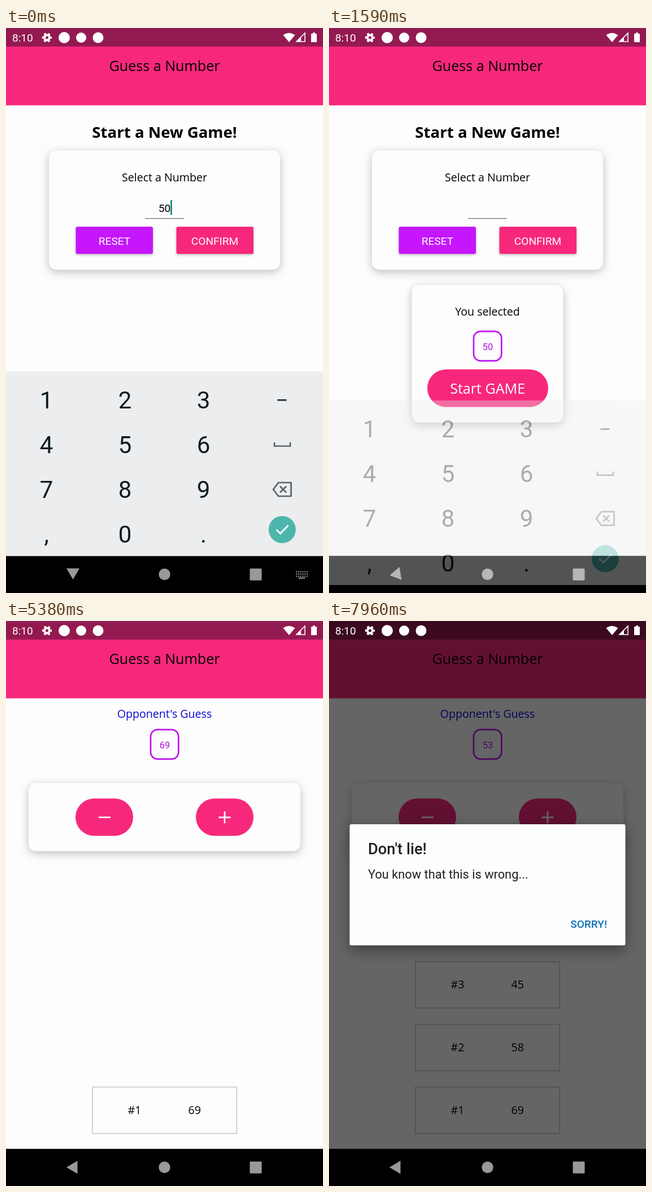
Animation of 561 by 998 pixels, one loop 8000 ms. Source, as an HTML page:

```html
<!DOCTYPE html>
<html lang="en">
<head>
<meta charset="utf-8">
<title>Guess a Number</title>
<style>
  html, body { margin: 0; width: 100%; height: 100%; overflow: hidden; background: #fdfdfd; }
  svg { display: block; width: 100vw; height: 100vh; font-family: Roboto, sans-serif; font-size: 19.1px; }
  .open { font-family: "Open Sans", sans-serif; font-size: 19.6px; }
  .mid { text-anchor: middle; }
  .title { font-size: 25.1px; }
  .head { font-size: 27.6px; font-weight: 700; }
  .medium { font-weight: 500; }
  .card { fill: #fdfdfd; filter: drop-shadow(0 4px 8px rgba(0, 0, 0, .25)); }
  .flat { filter: drop-shadow(0 2px 2px rgba(0, 0, 0, .25)); }
  .dialog { fill: #fdfdfd; filter: drop-shadow(0 8px 12px rgba(0, 0, 0, .4)); }
  .pink { fill: #f7287b; }
  .purple { fill: #c516fd; }
  .ring { fill: none; stroke: #c012ee; stroke-width: 2.7; }
  .picked { fill: #b414de; font-size: 16.4px; }
  .row rect { fill: none; stroke: #c8c8d0; stroke-width: 1.6; }
  .line { fill: none; stroke-width: 2.7; }
  #digits { font-size: 42px; fill: #0d1c22; }
</style>
</head>
<body>
<svg viewBox="0 0 561 998" preserveAspectRatio="none">
  <rect width="561" height="998" fill="#fdfdfd"/>
  <rect class="pink" width="561" height="136.6"/>
  <rect width="561" height="32.8" fill="#931a50"/>
  <text class="open mid title" x="280.5" y="76">Guess a Number</text>

  <g id="setup">
    <text class="open mid head" x="280.5" y="193.5">Start a New Game!</text>
    <rect class="card" x="76" y="216" width="409" height="211" rx="13.6"/>
    <text class="open mid" x="280.5" y="270.5">Select a Number</text>
    <path d="M246 336.5H315" stroke="#858585" stroke-width="1.5"/>
    <g id="entry">
      <text class="mid" x="280.5" y="324.5">50</text>
      <rect id="cursor" x="291.2" y="304" width="2.6" height="26" fill="#008577"/>
    </g>
    <rect class="purple flat" x="123.5" y="351" width="136.5" height="48" rx="3"/>
    <rect class="pink flat" x="301.5" y="351" width="136.5" height="48" rx="3"/>
    <text class="mid" x="192" y="382.5" fill="#fff">RESET</text>
    <text class="mid" x="369.5" y="382.5" fill="#fff">CONFIRM</text>
    <g id="selected">
      <rect class="card" x="146.5" y="454" width="268" height="243" rx="13.6"/>
      <text class="open mid" x="280.5" y="508">You selected</text>
      <rect class="ring" x="256" y="535.8" width="49.3" height="52" rx="12.3"/>
      <text class="mid picked" x="281" y="569">50</text>
      <g id="start">
        <rect class="pink" x="174" y="603" width="214" height="66.5" rx="33.2"/>
        <text class="open mid title" x="280.7" y="645.5" fill="#fff">Start GAME</text>
      </g>
    </g>
  </g>

  <g id="game">
    <text class="open mid" x="280.5" y="170.5" fill="#0808d0">Opponent's Guess</text>
    <rect class="ring" x="256" y="191.8" width="49.3" height="52" rx="12.3"/>
    <text id="guess" class="mid picked" x="281" y="225"></text>
    <rect class="card" x="40" y="286" width="481" height="120.5" rx="13.6"/>
    <g id="lower">
      <rect class="pink" x="123" y="313.5" width="102" height="66" rx="33"/>
      <path class="line" stroke="#fff" d="M164 346.8H185"/>
    </g>
    <g id="greater">
      <rect class="pink" x="336" y="313.5" width="102" height="66" rx="33"/>
      <path class="line" stroke="#fff" d="M376.5 346.8H397.5M387 336.3V357.3"/>
    </g>
    <g id="rows"></g>
  </g>

  <g id="alert">
    <rect width="561" height="933" opacity=".6"/>
    <rect class="dialog" x="36.5" y="359" width="488" height="214" rx="3"/>
    <text class="medium" x="69" y="412" font-size="27.3" fill="#202020">Don't lie!</text>
    <text x="69" y="454.5" font-size="21.8" fill="#202020">You know that this is wrong...</text>
    <text class="medium" x="492" y="542" text-anchor="end" fill="#1272b6">SORRY!</text>
  </g>

  <g id="status" fill="#fff">
    <text x="11" y="24">8:10</text>
    <circle cx="72.5" cy="17" r="4.5" fill="none" stroke="#fff" stroke-width="4"/>
    <circle cx="72.5" cy="17" r="7.3" fill="none" stroke="#fff" stroke-width="2.6" stroke-dasharray="4 3.645" stroke-dashoffset="2"/>
    <circle cx="103" cy="17" r="10"/>
    <circle cx="133" cy="17" r="9"/>
    <circle cx="163" cy="17" r="9.5"/>
    <path d="M490.5 12.5Q501 5 511.5 12.5L501 25Z"/>
    <path d="M529 9V24H514Z" fill="none" stroke="#fff" stroke-width="1.6"/>
    <path d="M522 16V24H514Z"/>
    <path d="M540 10H543V8H547V10H550V25H540Z"/>
  </g>

  <rect y="932.4" width="561" height="65.6"/>
  <g fill="#999">
    <path id="back" d="M107 954.5H130L118.5 974Z"/>
    <circle cx="280.5" cy="965" r="10.2"/>
    <rect x="431.5" y="954.8" width="21" height="21" rx="1.5"/>
    <g id="switcher" stroke="#999" stroke-width="2">
      <path d="M513 960.5H534.5M513 964.5H534.5M513 968.5H534.5" stroke-dasharray="2.2 1.6"/>
      <path d="M517.5 971.5H529.5"/>
    </g>
  </g>

  <g id="keyboard">
    <rect y="606.6" width="561" height="326" fill="#ecedee"/>
    <g id="digits" class="mid"></g>
    <path class="line" stroke="#17262b" d="M480.5 657.2H496.5"/>
    <g class="line" stroke="#596468">
      <path d="M475 732V738.5H503V732"/>
      <path d="M482 803H504.5V827H482L473 815ZM485 809.5L496 820.5M496 809.5L485 820.5" stroke-linejoin="round"/>
    </g>
    <circle cx="488.8" cy="886" r="24" fill="#4db6ac"/>
    <path class="line" stroke="#fff" d="M478.5 886L485.5 893L499.5 878.5"/>
  </g>
</svg>
<script>
  const LOOP = 8000, CONFIRM = 1500, BEGIN = 2700, LIE = 7700;
  const guesses = [
    { at: BEGIN, value: 69 },
    { at: 5950, value: 58, button: "lower" },
    { at: 6640, value: 45, button: "lower" },
    { at: 7230, value: 53, button: "greater" }
  ];
  const $ = id => document.getElementById(id);
  const show = (id, visible) => { $(id).style.display = visible ? "" : "none"; };
  const progress = (t, from, length) => Math.min(1, Math.max(0, (t - from) / length));
  const ease = p => p < .5 ? 2 * p * p : 1 - 2 * (1 - p) ** 2;

  $("digits").innerHTML = ["123", "456", "789", ",0."].map((line, r) =>
    [...line].map((key, c) => `<text x="${71.6 + c * 139}" y="${672 + r * 79}">${key}</text>`).join("")
  ).join("");

  $("rows").innerHTML = guesses.map((g, i) =>
    `<g class="row open" id="row${i}" transform="translate(0 ${-110.8 * i})">
      <rect x="152.8" y="823.3" width="255.5" height="82"/>
      <text x="215.5" y="871">#${i + 1}</text><text x="322.5" y="871">${g.value}</text>
    </g>`).join("");

  // A touched button fades before release and recovers after it.
  const touch = (t, release) => t < release
    ? 1 - .6 * ease(progress(t, release - 80, 80))
    : .4 + .6 * ease(progress(t, release, 250));

  const pressed = (t, button) => guesses.reduce(
    (opacity, g) => g.button === button ? Math.min(opacity, touch(t, g.at)) : opacity, 1);

  function draw(t) {
    const typing = t < CONFIRM, playing = t >= BEGIN;
    show("setup", !playing);
    show("game", playing);
    show("entry", typing);
    show("selected", !typing);
    show("cursor", (t + 430) % 1000 < 500);
    show("switcher", typing);
    $("start").style.opacity = touch(t, BEGIN);

    const hide = progress(t, CONFIRM, 140);
    show("keyboard", hide < 1);
    $("keyboard").setAttribute("transform", `translate(0 ${79 * hide})`);
    $("keyboard").style.opacity = 1 - hide;
    const turn = 90 * ease(progress(t, CONFIRM - 20, 144));
    $("back").setAttribute("transform", `rotate(${turn} 117.25 963.75)`);

    guesses.forEach((g, i) => {
      show("row" + i, t >= g.at);
      if (t >= g.at) $("guess").textContent = g.value;
    });
    $("lower").style.opacity = pressed(t, "lower");
    $("greater").style.opacity = Math.min(pressed(t, "greater"), touch(t, LIE));

    const alert = progress(t, LIE + 30, 200);
    show("alert", alert > 0);
    $("alert").style.opacity = alert;
  }

  function tick() {
    draw(performance.now() % LOOP);
    requestAnimationFrame(tick);
  }
  tick();
</script>
</body>
</html>
```
